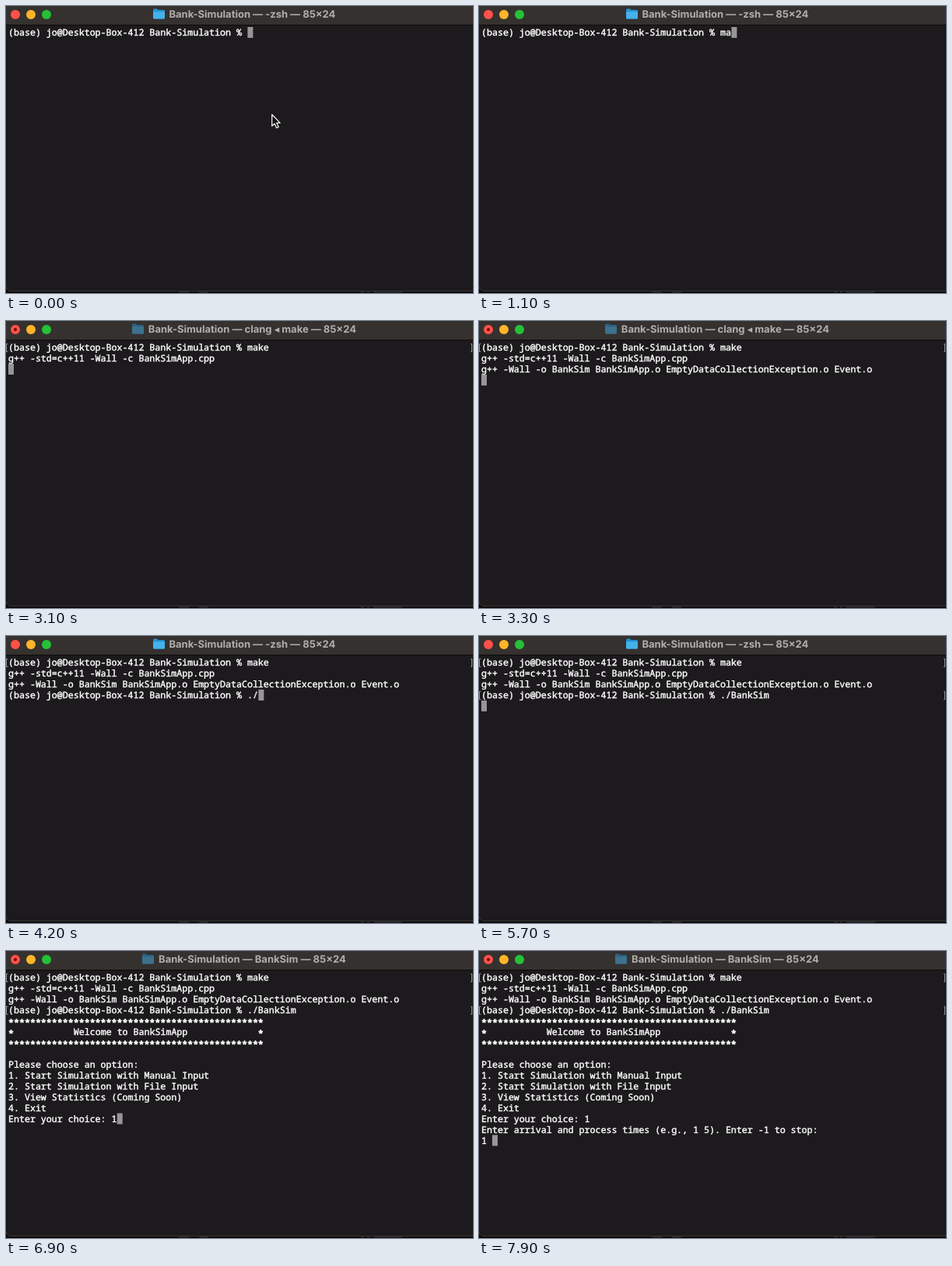
An HTML page for the animation above (8000 ms loop, 600 px wide and 369 px high).

```html
<!DOCTYPE html>
<html lang="en">
<head>
<meta charset="utf-8">
<title>Terminal session</title>
<style>
  html, body { margin: 0; width: 100%; height: 100%; overflow: hidden; background: #0c090b; }
  svg { display: block; width: 100vw; height: 100vh; }
  text { white-space: pre; text-rendering: geometricPrecision; }
  #title { font: 700 13px Inter, "DejaVu Sans", sans-serif; fill: #b1aeab; text-anchor: middle; }
  #screen { font: 500 11.643px "Noto Sans Mono", "DejaVu Sans Mono", monospace; }
  #screen text { fill: #fff; stroke: #fff; stroke-width: .42; stroke-linejoin: round; }
  #screen .star { stroke-width: .8; }
  .mark { fill: none; stroke: #9a989a; stroke-width: 1; }
</style>
</head>
<body>
<svg viewBox="0 0 600 369">
  <rect width="600" height="369" fill="#0c090b"/>
  <path d="M222 368h13M248 368h12M456 368h4M464 368h3M472 368h37" stroke="#353234"/>
  <path d="M0 0H600V366.5H6Q1 366 0 361Z" fill="#1c1a1c"/>
  <path d="M0 361Q1 366 6 366.5H600" fill="none" stroke="#454244" stroke-width=".8"/>
  <rect width="600" height="24.5" fill="#35312f"/>
  <rect y="24" width="600" height="1" fill="#0b0a0a"/>
  <circle cx="12" cy="11" r="6" fill="#ff5149"/>
  <circle cx="32" cy="11" r="6" fill="#ffb429"/>
  <circle cx="52" cy="11" r="6" fill="#25c138"/>
  <circle id="dot" cx="12" cy="11" r="2" fill="#6d0b08"/>
  <g id="folder">
    <path d="M0 1.5Q0 0 1.5 0H5L6.5 1.5H13.5Q15 1.5 15 3V11.5Q15 13 13.5 13H1.5Q0 13 0 11.5Z" fill="#2191d2"/>
    <path d="M0 3.7H15V11.5Q15 13 13.5 13H1.5Q0 13 0 11.5Z" fill="#45b2ea"/>
  </g>
  <text id="title" x="316.4" y="15"></text>
  <rect id="cursor" width="7" height="14" fill="#979597"/>
  <g id="screen"></g>
  <path id="pointer" d="M341.7 139.5V154.3L345.1 151.2L347.6 156.8L350.2 155.7L347.7 150.3H352.2Z"
        fill="#111" stroke="#fff" stroke-width="1.2" stroke-linejoin="round"/>
</svg>
<script>
const LOOP = 8000;
const LEFT = 3, TOP = 27, COL = 6.986, ROW = 13.97, BASE = 11.1;
const STAR_DROP = 2.4;
const el = id => document.getElementById(id);

const prompt = '(base) jo@Desktop-Box-412 Bank-Simulation % ';
const stars = '*'.repeat(47);
const menu = [
  stars,
  '*' + ' '.repeat(11) + 'Welcome to BankSimApp' + ' '.repeat(13) + '*',
  stars,
  '',
  'Please choose an option:',
  '1. Start Simulation with Manual Input',
  '2. Start Simulation with File Input',
  '3. View Statistics (Coming Soon)',
  '4. Exit',
  'Enter your choice: '
].join('\n');

const keys = (start, step, word) => [...word].map((c, i) => [start + i * step, c]);

// Everything written to the terminal, in order of time
const stream = [
  [0, prompt],
  ...keys(1000, 100, 'make'),
  [1500, '\n'],
  [1900, 'g++ -std=c++11 -Wall -c BankSimApp.cpp\n'],
  [3200, 'g++ -Wall -o BankSim BankSimApp.o EmptyDataCollectionException.o Event.o\n'],
  [3600, prompt],
  ...keys(4000, 200, './'),
  ...keys(4400, 100, 'BankS'),
  ...keys(5000, 200, 'im'),
  [5600, '\n'],
  [6000, menu],
  [6900, '1'],
  [7300, '\nEnter arrival and process times (e.g., 1 5). Enter -1 to stop:\n'],
  ...keys(7800, 100, '1 ')
];

// Window title by time: process, folder position, busy state
const titles = [
  { at: 0, name: '-zsh', x: 189, busy: false },
  { at: 2100, name: 'clang ◂ make', x: 162, busy: true },
  { at: 3700, name: '-zsh', x: 189, busy: false },
  { at: 5800, name: 'BankSim', x: 175, busy: true }
];

const marks = [{ at: 1500, row: 0 }, { at: 5600, row: 3 }];

const escape = s => s.replace(/&/g, '&amp;').replace(/</g, '&lt;');

function textAt(row, content, kind = 'plain', drop = 0) {
  if (!content.trim()) return '';
  const x = LEFT + content.search(/\S/) * COL;
  const y = TOP + BASE + row * ROW + drop;
  return `<text class="${kind}" x="${x}" y="${y}">${escape(content.trim())}</text>`;
}

// Asterisks sit lower and heavier than the other characters
function lineAt(line, row) {
  return textAt(row, line.replace(/\*/g, ' ')) +
         textAt(row, line.replace(/[^*]/g, ' '), 'star', STAR_DROP);
}

function markAt(row) {
  const y = TOP + 2.5 + row * ROW;
  return `<path class="mark" d="M2.5 ${y}H.5v10h2M597 ${y}h1.5v10h-1.5"/>`;
}

let shown = '';

function draw(t) {
  const past = e => e.at <= t;
  const lines = stream.filter(([at]) => at <= t).map(e => e[1]).join('').split('\n');
  const { name, x, busy } = titles.filter(past).pop();
  const html = lines.map(lineAt).join('') + marks.filter(past).map(m => markAt(m.row)).join('');

  if (html !== shown) el('screen').innerHTML = shown = html;
  const row = lines.length - 1;
  el('cursor').setAttribute('x', LEFT + lines[row].length * COL);
  el('cursor').setAttribute('y', TOP + row * ROW);

  el('title').textContent = `Bank-Simulation — ${name} — 85×24`;
  el('folder').setAttribute('transform', `translate(${x} 3.6)`);
  el('folder').setAttribute('opacity', busy ? 0.5 : 1);
  el('dot').setAttribute('visibility', busy ? 'visible' : 'hidden');
  el('pointer').setAttribute('visibility', t < 1000 ? 'visible' : 'hidden');
}

const start = performance.now();
function tick(now) {
  draw(Math.max(0, now - start) % LOOP);
  requestAnimationFrame(tick);
}
draw(0);
requestAnimationFrame(tick);
</script>
</body>
</html>
```
